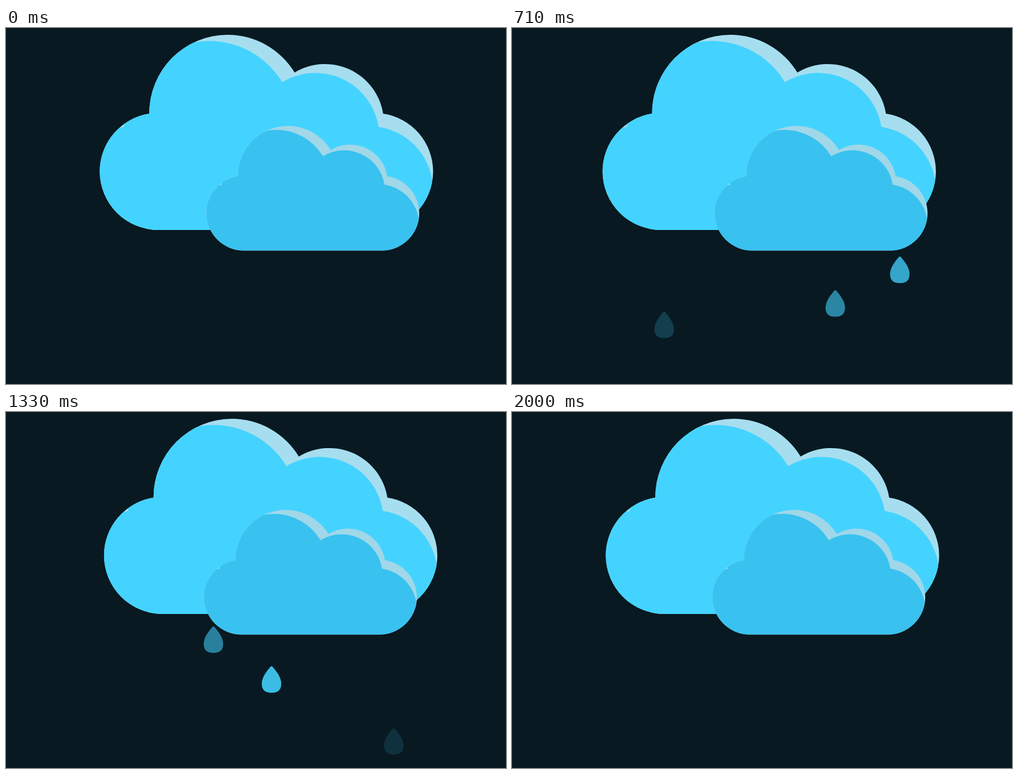
An HTML page for the animation above (2.04 s loop, 887 by 631 pixels).

```html
<!DOCTYPE html>
<html lang="en">
<head>
<meta charset="utf-8">
<title>Rain clouds</title>
<style>
  html, body { margin: 0; height: 100%; overflow: hidden; background: #081921; }
  svg { display: block; width: 887px; height: 631px; }
</style>
</head>
<body>
<svg viewBox="0 0 887 631">
  <defs>
    <path id="cloud" d="M270.3 358A104 104 0 0 1 166.3 254.3A104 104 0 0 1 254.2 151.8
      A139 139 0 0 1 393 12A139 139 0 0 1 512 79A104.3 104.3 0 0 1 669 151.8
      A104 104 0 0 1 757.7 254.3A104 104 0 0 1 653.7 358Z"/>
    <clipPath id="inside"><use href="#cloud"/></clipPath>
    <!-- pale rim with an enlarged copy of the cloud clipped inside it -->
    <g id="shaded">
      <use href="#cloud" style="fill: var(--rim)"/>
      <g clip-path="url(#inside)">
        <use href="#cloud" transform="matrix(1.089 0 0 1.089 -67.6 10)"/>
      </g>
    </g>
    <path id="drop" d="M-1.3 .7Q0 -.6 1.3 .7C8 8 17.3 20 17.3 31C17.3 42.5 11 47.3 0 47.3
      S-17.3 42.5 -17.3 31C-17.3 20 -8 8 -1.3 .7Z"/>
  </defs>
  <g id="rain" fill="#44d3ff"></g>
  <g id="big" fill="#44d3ff" style="--rim: #a6deef"><use href="#shaded"/></g>
  <g id="small" fill="#39c2ef" style="--rim: #a0d7e9">
    <use href="#shaded" transform="matrix(.6387 0 0 .6387 249.2 165.8)"/>
  </g>
</svg>
<script>
const LOOP = 2040, FPS = 24, PEAK = 0.91;
const $ = id => document.getElementById(id);
const move = (el, x, y = 0) => el.setAttribute("transform", `translate(${x} ${y})`);
const mix = (a, b, p) => a + (b - a) * p;
const ease = p => p * p / (p * p + (1 - p) * (1 - p));

// Eases from rest to each turning point [ms, px] and back to rest
function sway(turns, t) {
  let t0 = 0, x0 = 0;
  for (const [t1, x1] of [...turns, [LOOP, 0]]) {
    if (t < t1) return mix(x0, x1, ease((t - t0) / (t1 - t0)));
    [t0, x0] = [t1, x1];
  }
  return 0;
}

// Falls at a steady speed, fading in and then out
function addDrop(x, from, to, top, bottom) {
  const el = document.createElementNS("http://www.w3.org/2000/svg", "use");
  el.setAttribute("href", "#drop");
  $("rain").append(el);
  return t => {
    const p = (t - from) / (to - from);
    move(el, x, mix(top, bottom, p));
    el.setAttribute("opacity", Math.max(0, PEAK * (1 - Math.abs(2 * p - 1))));
  };
}

const drops = [
  addDrop(270, 0, 795, 270, 531),
  addDrop(573.5, 70, 1012, 266, 559),
  addDrop(688, 205, 1418, 280, 581),
  addDrop(471, 880, 1758, 311, 581),
  addDrop(368, 1065, 1940, 297, 567)
];

function draw(time) {
  const t = Math.floor((time + 5) * FPS / 1000) * 1000 / FPS;
  move($("big"), sway([[585, -6], [1570, 8.9]], t));
  move($("small"), sway([[830, 4.15], [1205, -4.35]], t));
  drops.forEach(drop => drop(t));
}

const start = performance.now();
function tick() {
  draw((performance.now() - start) % LOOP);
  requestAnimationFrame(tick);
}
tick();
</script>
</body>
</html>
```
